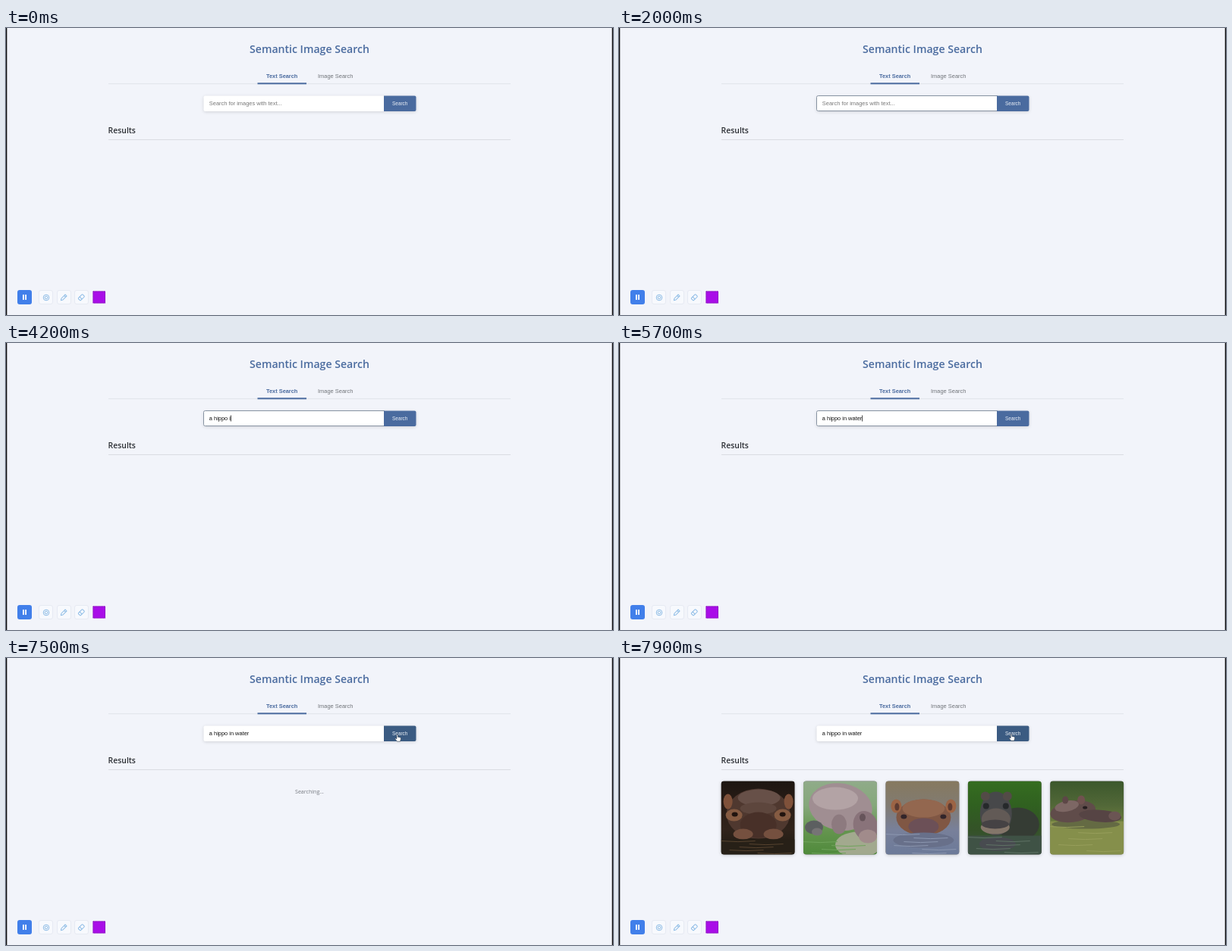
Recreate the animation shown at these times as an HTML page with a canvas. Size 800 by 379 pixels, loop 8000 ms.

```html
<!DOCTYPE html>
<html lang="en">
<head>
<meta charset="utf-8">
<title>Semantic Image Search</title>
<style>
html, body { margin: 0; width: 100%; height: 100%; overflow: hidden; background: #f2f4fa; }
canvas { display: block; width: 800px; height: 379px; }
</style>
</head>
<body>
<canvas id="stage"></canvas>
<script>
const W = 800, H = 379, LOOP = 8000, STEP = 100;
const QUERY = 'a hippo in water';
const TYPE_START = 2760, KEY_GAP = 180, BLINK = 530;
const FOCUS = 1000, HOVER = 6400, CLICK = 6700, RESULTS = 7600;
const SANS = '"Liberation Sans", Arial, sans-serif';
const HUMAN = '"Open Sans", "Noto Sans", sans-serif';
const BLUE = '#4a6b9f';

const canvas = document.getElementById('stage');
const ctx = canvas.getContext('2d');
const dpr = window.devicePixelRatio || 1;
canvas.width = W * dpr;
canvas.height = H * dpr;
ctx.scale(dpr, dpr);

function rect(x, y, w, h, color) {
  ctx.fillStyle = color;
  ctx.fillRect(x, y, w, h);
}

function round(x, y, w, h, r, fill, stroke) {
  ctx.beginPath();
  ctx.roundRect(x, y, w, h, r);
  if (fill) { ctx.fillStyle = fill; ctx.fill(); }
  if (stroke) { ctx.strokeStyle = stroke; ctx.stroke(); }
}

function shadowed(alpha, paint) {
  ctx.save();
  ctx.shadowColor = `rgba(0,0,0,${alpha})`;
  ctx.shadowBlur = 4 * dpr;
  ctx.shadowOffsetY = dpr;
  paint();
  ctx.restore();
}

function text(str, x, y, font, color, align = 'left') {
  ctx.font = font;
  ctx.fillStyle = color;
  ctx.textAlign = align;
  ctx.fillText(str, x, y);
}

function oval(x, y, rx, ry, color, turn = 0) {
  ctx.beginPath();
  ctx.ellipse(x, y, rx, ry, turn, 0, Math.PI * 2);
  ctx.fillStyle = color;
  ctx.fill();
}

function pair(x1, x2, y, rx, ry, color) {
  oval(x1, y, rx, ry, color);
  oval(x2, y, rx, ry, color);
}

function backdrop(...colors) {
  const g = ctx.createLinearGradient(0, 0, 0, 97);
  colors.forEach((c, i) => g.addColorStop(i / (colors.length - 1), c));
  rect(0, 0, 97, 97, g);
}

function ripples(y0, gap, color) {
  ctx.strokeStyle = color;
  ctx.lineWidth = 1;
  for (let y = y0, i = 0; y < 96; y += gap, i++) {
    const x = (i * 37) % 50;
    ctx.beginPath();
    ctx.moveTo(x, y);
    ctx.quadraticCurveTo(x + 22, y + 2, x + 45, y);
    ctx.stroke();
  }
}

const photos = [
  () => {
    backdrop('#1d1611', '#2a1d17', '#30231b', '#1d1a12');
    oval(49, 43, 42, 33, '#4f382f');
    oval(50, 22, 28, 11, '#675048');
    oval(49, 36, 24, 8, '#5d463d');
    pair(9, 89, 27, 6, 10, '#7f513a');
    pair(17, 81, 45, 11, 8, '#855b42');
    pair(18, 81, 44, 4, 3, '#21140f');
    oval(49, 58, 24, 17, '#483028');
    pair(29, 69, 70, 13, 7, '#75503f');
    rect(0, 77, 97, 20, '#272017');
    ripples(79, 4, '#57432f');
  },
  () => {
    backdrop('#90ab89', '#85a87b', '#65954f', '#4f8a3b');
    oval(72, 84, 30, 17, '#a2a98e');
    oval(49, 34, 42, 31, '#a08e92', 0.18);
    oval(42, 23, 30, 15, '#b3a3a5');
    oval(47, 57, 10, 13, '#8d7a7f');
    oval(82, 59, 16, 20, '#89737a', -0.3);
    oval(85, 73, 12, 9, '#a18b8b');
    oval(78, 48, 4, 5, '#66545a');
    oval(14, 61, 12, 9, '#5c5f60');
    oval(18, 67, 7, 5, '#767475');
    ripples(80, 5, '#6fa35b');
  },
  () => {
    backdrop('#86795f', '#817b72', '#78809a', '#6c7a99');
    oval(50, 48, 36, 24, '#805744');
    oval(50, 36, 28, 12, '#93674f');
    pair(14, 86, 33, 7, 9, '#9c6445');
    pair(15, 85, 34, 3, 5, '#5d3b32');
    pair(24, 76, 47, 4, 3, '#32252a');
    oval(50, 60, 20, 11, '#6c5057');
    oval(50, 78, 40, 10, '#68708a');
    ripples(70, 5, '#8c97b0');
  },
  () => {
    backdrop('#356d20', '#306020', '#345228', '#3f5243');
    oval(66, 57, 28, 22, '#353c34');
    oval(37, 43, 21, 29, '#47484a');
    pair(23, 52, 20, 6, 6, '#534b47');
    pair(24, 50, 33, 4, 4, '#26292b');
    oval(37, 50, 19, 14, '#625a56');
    oval(36, 61, 19, 9, '#84766a');
    oval(36, 57, 18, 6, '#454244');
    rect(0, 72, 97, 25, '#3f5245');
    oval(39, 83, 24, 9, '#484b50');
    ripples(74, 5, '#5f7365');
  },
  () => {
    backdrop('#3c582c', '#526838', '#76853f', '#8a944d');
    rect(0, 53, 97, 44, '#858f4b');
    oval(47, 57, 45, 6, '#646a43');
    oval(30, 40, 30, 14, '#604c4a', -0.15);
    oval(66, 46, 28, 8, '#564444', 0.08);
    oval(22, 33, 16, 7, '#7d6764', -0.2);
    oval(41, 25, 5, 6, '#70524f');
    oval(20, 25, 4, 5, '#5d4747');
    oval(46, 35, 3, 2, '#271f20');
    oval(85, 46, 8, 6, '#6b5553');
    ripples(60, 8, '#979e5b');
  }
];

function drawPhotos() {
  photos.forEach((paint, i) => {
    const x = 134.6 + i * 108.4, y = 162.6;
    shadowed(0.18, () => round(x, y, 97, 97, 4, '#777'));
    ctx.save();
    ctx.beginPath();
    ctx.roundRect(x, y, 97, 97, 4);
    ctx.clip();
    ctx.translate(x, y);
    paint();
    ctx.restore();
  });
}

// runs paint in a frame centred on x, y and turned along the rising diagonal
function slanted(x, y, paint) {
  ctx.save();
  ctx.translate(x, y);
  ctx.rotate(-Math.PI / 4);
  paint();
  ctx.restore();
}

function drawToolbar() {
  ctx.lineWidth = 1;
  round(15, 346, 19, 19, 3, '#417fea');
  round(22, 352, 1.8, 7, 0.5, '#fff');
  round(25.2, 352, 1.8, 7, 0.5, '#fff');
  for (const x of [43.5, 67.5, 90.5]) round(x, 346.5, 18, 18, 2.5, '#f7f9fd', '#e6eaf3');

  const ink = '#8dbce6';
  ctx.strokeStyle = ink;
  for (const r of [3.8, 1.8]) {
    ctx.beginPath();
    ctx.arc(53, 356, r, 0, Math.PI * 2);
    ctx.stroke();
  }

  slanted(76, 356, () => {
    ctx.beginPath();
    ctx.moveTo(-5, 0);
    ctx.lineTo(-3, -1.4);
    ctx.lineTo(4.3, -1.4);
    ctx.lineTo(4.3, 1.4);
    ctx.lineTo(-3, 1.4);
    ctx.closePath();
    ctx.moveTo(2.2, -1.4);
    ctx.lineTo(2.2, 1.4);
    ctx.stroke();
  });

  slanted(99.3, 355.8, () => {
    round(-4, -2.2, 8, 4.4, 1, null, ink);
    ctx.beginPath();
    ctx.moveTo(-1, -2.2);
    ctx.lineTo(-1, 2.2);
    ctx.stroke();
  });

  rect(114.5, 347.5, 16.5, 16, '#a90de8');
  ctx.setLineDash([1, 1]);
  ctx.strokeStyle = '#7b1aa6';
  ctx.strokeRect(115, 348, 15.5, 15);
  ctx.setLineDash([]);
}

function drawSearch(t) {
  const focused = t >= FOCUS && t < CLICK;
  const keys = Math.floor((t - TYPE_START) / KEY_GAP) + 1;
  const typed = Math.max(0, Math.min(QUERY.length, keys));
  const value = QUERY.slice(0, typed);

  shadowed(0.14, () => round(260.5, 89.5, 280, 20.5, 2, '#fff'));
  if (focused) {
    ctx.lineWidth = 1;
    round(260.5, 89.5, 238, 20, [2, 0, 0, 2], null, '#8793a2');
  }
  round(498, 89.5, 42.5, 20.5, [0, 2, 2, 0], t >= HOVER ? '#3b5b82' : BLUE);
  text('Search', 519.2, 102, '6.4px ' + SANS, '#eef2f8', 'center');

  const font = '7.45px ' + SANS;
  if (typed) text(value, 267.8, 102, font, '#111');
  else text('Search for images with text...', 267.8, 102, font, '#777');

  // the caret restarts its blink at every key
  const lastKey = typed ? TYPE_START + (typed - 1) * KEY_GAP : FOCUS;
  if (focused && (t - lastKey) % (2 * BLINK) < BLINK) {
    ctx.font = font;
    rect(267.8 + ctx.measureText(value).width, 95.5, 0.8, 8, '#111');
  }
}

// time, x, y of the pointer's centre
const path = [[HOVER, 510, 105], [CLICK, 523, 105.5], [6900, 523, 105.5], [RESULTS, 516.4, 105.5], [7900, 518, 104.6]];

function pointerAt(t) {
  const i = path.findIndex(p => p[0] > t);
  if (i < 0) return path[path.length - 1].slice(1);
  const [t0, x0, y0] = path[i - 1], [t1, x1, y1] = path[i];
  const k = (t - t0) / (t1 - t0), e = k * k * (3 - 2 * k);
  return [x0 + (x1 - x0) * e, y0 + (y1 - y0) * e];
}

function drawPointer(t) {
  if (t < HOVER) return;
  const [x, y] = pointerAt(t);
  ctx.save();
  ctx.translate(x, y);
  ctx.beginPath();
  ctx.moveTo(-1.8, 1.2);
  ctx.lineTo(-1.8, -4);
  ctx.quadraticCurveTo(-1, -5.2, -0.2, -4);
  ctx.lineTo(-0.2, -1.2);
  ctx.lineTo(3, -0.6);
  ctx.quadraticCurveTo(4, 0, 3.7, 1.5);
  ctx.lineTo(2.8, 4.7);
  ctx.lineTo(-1.3, 4.7);
  ctx.lineTo(-4, 1.2);
  ctx.quadraticCurveTo(-3.6, 0, -1.8, 1.2);
  ctx.closePath();
  ctx.fillStyle = '#fff';
  ctx.fill();
  ctx.lineWidth = 0.6;
  ctx.strokeStyle = '#27364a';
  ctx.stroke();
  ctx.restore();
}

function draw(t) {
  rect(0, 0, W, H, '#f2f4fa');
  text('Semantic Image Search', 400, 33, '600 14.1px ' + HUMAN, BLUE, 'center');

  rect(135, 73.2, 530, 1, '#e0e3e9');
  rect(331.5, 72.3, 64.5, 2, BLUE);
  text('Text Search', 363.7, 66.2, 'bold 7.4px ' + SANS, BLUE, 'center');
  text('Image Search', 434.2, 66.2, '7.45px ' + SANS, '#6f7378', 'center');

  drawSearch(t);

  text('Results', 134.6, 138.7, '600 10.4px ' + HUMAN, '#2b2e33');
  rect(135, 147, 530, 1, '#dadce2');
  if (t >= RESULTS) drawPhotos();
  else if (t >= CLICK) text('Searching...', 400, 179, '7.1px ' + HUMAN, '#777b82', 'center');

  drawToolbar();
  drawPointer(t);
  rect(0, 0, 1.3, H, '#0a0a0c');
  rect(W - 1.3, 0, 1.3, H, '#0a0a0c');
}

function frame() {
  draw(Math.floor((performance.now() % LOOP) / STEP) * STEP);
  requestAnimationFrame(frame);
}
frame();
</script>
</body>
</html>
```
